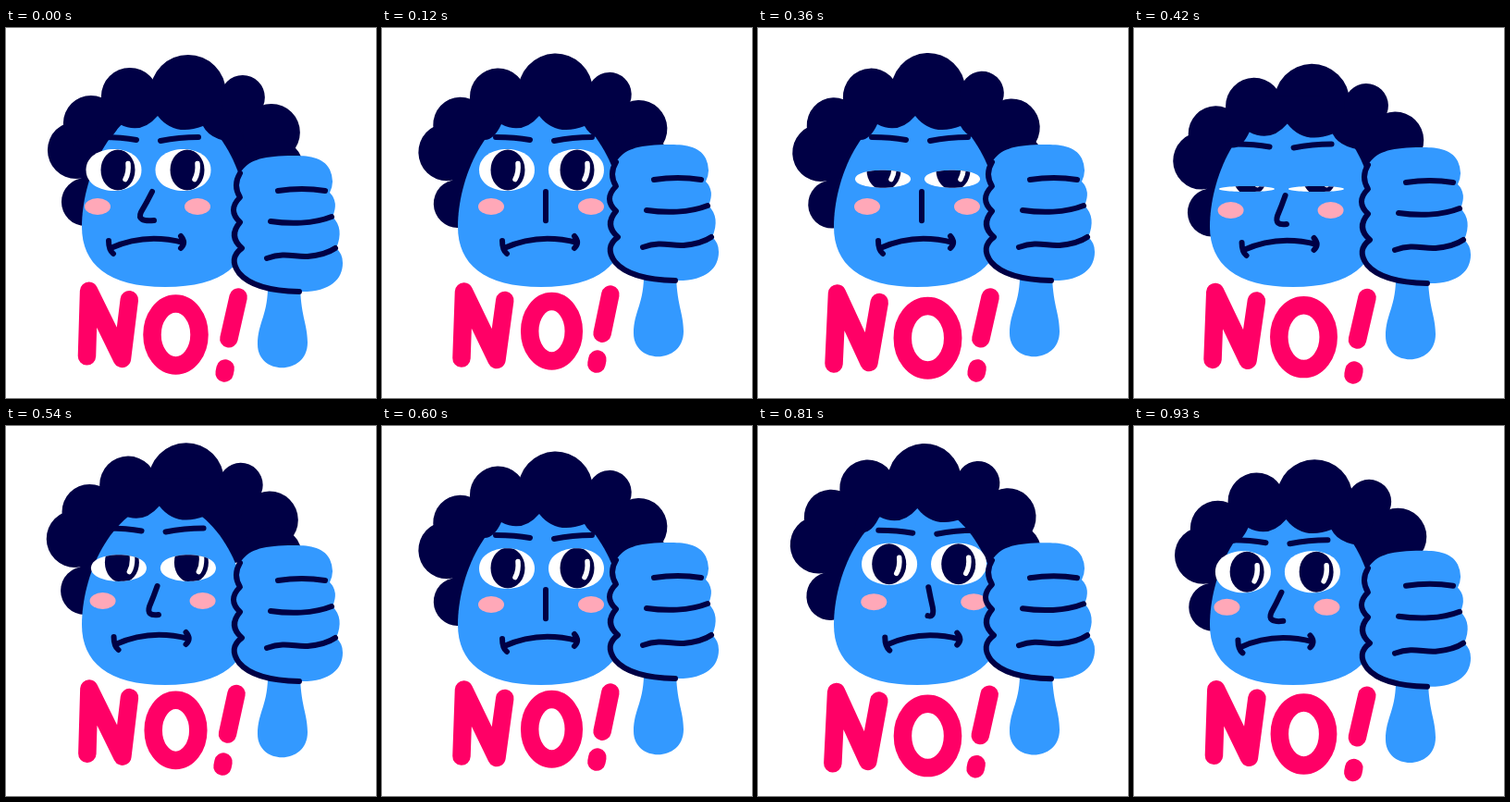
An HTML page with a canvas that plays this animation: 400x400 px, repeating every 960 ms.

```html
<!DOCTYPE html>
<html>
<head>
<meta charset="utf-8">
<title>No!</title>
<style>
  html, body { margin: 0; width: 100%; height: 100%; overflow: hidden; background: #fff; }
  canvas { display: block; width: 400px; height: 400px; }
</style>
</head>
<body>
<canvas id="stage" width="400" height="400"></canvas>
<script>
const ctx = document.getElementById('stage').getContext('2d');
const LOOP = 960, STEP = 30, TAU = Math.PI * 2;
const BLUE = '#3399ff', NAVY = '#000045', PINK = '#ff0066', BLUSH = '#ffa8b8';

// Curls around the head: x, y, radius
const curls = [
  [86, 188, 26], [76, 132, 31], [92, 103, 30], [134, 74, 31],
  [197, 70, 41], [256, 75, 24], [287, 113, 31], [290, 152, 32]
];
const face = 'M82 215C82 165 110 90 172 80C234 90 262 165 262 215C262 255 235 280 172 280C110 280 82 255 82 215Z';
const fringe = 'M96 118Q112 128 123 104Q146 116 164 95Q182 118 213 106Q222 124 258 124L250 100L200 65L140 65L100 100Z';
const thumb = 'M283 275C284 310 272 318 272 342C272 376 326 376 326 340C326 320 318 310 318 275Z';
const knuckles = 'M253 157Q245 170 253 183Q239 197 253 210Q240 225 255 238Q240 249 252 265Q268 284 317 285';
const fist = knuckles + 'C350 286 364 272 364 254Q364 244 357 238Q366 217 353 204Q360 188 350 178Q356 166 350 153' +
  'C342 137 320 138 305 138C275 139 262 143 253 157Z';
const fingerLines = 'M294 176Q320 172 345 176M286 209C306 212 332 212 352 204M282 249C302 242 312 248 326 247Q346 245 356 238';

const smooth = (from, to, t) => {
  const u = Math.min(1, Math.max(0, (t - from) / (to - from)));
  return u * u * (3 - 2 * u);
};

function fill(path, color) {
  ctx.fillStyle = color;
  ctx.fill(new Path2D(path));
}

function stroke(path, color = NAVY, width = 6) {
  ctx.strokeStyle = color;
  ctx.lineWidth = width;
  ctx.stroke(new Path2D(path));
}

function oval(x, y, rx, ry, color) {
  ctx.fillStyle = color;
  ctx.beginPath();
  ctx.ellipse(x, y, rx, ry, 0, 0, TAU);
  ctx.fill();
}

function group(dx, dy, draw) {
  ctx.save();
  ctx.translate(dx, dy);
  draw();
  ctx.restore();
}

function drawHair(turn, bob) {
  ctx.save();
  ctx.transform(1 - .03 * turn, -.07 * turn, .07 * turn, 1, -21.3 * turn, 10.5 * (turn - bob));
  fill('M' + curls.map(([x, y]) => x + ' ' + y).join('L') + 'Z', NAVY);
  for (const [x, y, r] of curls) oval(x, y, r, r, NAVY);
  ctx.restore();
}

function drawEye(x, y, look, shut) {
  const lid = 30 - 26 * shut;
  group(x, y + 14.5 * shut, () => {
    const shape = `M-30 0C-30 ${-lid} 30 ${-lid} 30 0C30 ${lid} -30 ${lid} -30 0Z`;
    fill(shape, '#fff');
    ctx.clip(new Path2D(shape));
    ctx.translate(look, -14.5 * shut);
    oval(0, 0, 18.5, 22, NAVY);
    stroke('M11 -7Q12 3 8 10', '#fff', 5.5);
  });
}

function drawFeatures(side, bob, shut) {
  const dx = 19 * side;
  group(dx, -7.5 * bob, () => stroke('M123 118Q144 118 160 121M186 122Q206 118 227 118'));
  for (const x of [135, 210]) drawEye(x + 18.5 * side, 153.5 - 6 * bob, 1 - 3.5 * side, shut);
  group(dx, -4 * bob, () => {
    oval(118, 193, 14, 9, BLUSH);
    oval(226, 193, 14, 9, BLUSH);
  });
  const noseX = reach => 177 + reach * side;
  group(0, -4 * bob, () =>
    stroke(`M${noseX(19)} 177Q${noseX(25)} 189 ${noseX(31)} 199Q${noseX(36)} 210 ${noseX(17)} 208`));
  group(dx, -2 * bob, () =>
    stroke('M132 238Q169 221 211 232M130 230Q130 240 135 244M208 225Q214 232 208 238'));
}

function drawHand(lift) {
  group(0, -lift, () => {
    fill(thumb, BLUE);
    fill(fist, BLUE);
    stroke(knuckles);
    stroke(fingerLines);
  });
}

function drawWord(phase) {
  const n = Math.cos(phase - .52), o = Math.sin(phase), e = Math.cos(phase + .78);
  stroke(`M${84 + 4 * n} ${360 - 6 * n}L${87 + 3 * n} ${286 - 2 * n}` +
    `L${122 + 4 * n} ${360 - 3 * n}L${132 + 1.5 * n} ${295.5 - 2 * n}`, PINK, 19.5);
  ctx.beginPath();
  ctx.ellipse(183.5, 331.5 - 3.7 * o, 25.5 - 1.7 * o, 33.5 - 1.3 * o, 0, 0, TAU);
  ctx.stroke();
  const dotX = 234 + 3 * e, dotY = 366 + 7 * e;
  stroke(`M${249 + 3 * e} ${289.5 + 2 * e}L${239.5 + 2 * e} ${333 + 4 * e}` +
    `M${dotX + 1} ${dotY - 3}L${dotX} ${dotY + 2}`, PINK, 19.5);
}

function draw(t) {
  const phase = t / 480 * TAU;
  const side = -Math.cos(phase);
  const bob = Math.sin(2 * phase);
  const shut = smooth(280, 410, t) - smooth(440, 620, t);
  const drop = (1 + Math.cos(2 * phase)) / 2;

  ctx.clearRect(0, 0, 400, 400);
  ctx.lineCap = ctx.lineJoin = 'round';
  drawHair((1 - Math.cos(phase - .16)) / 2, bob);
  fill(face, BLUE);
  drawFeatures(side, bob, shut);
  group(6 + 6 * side, -8.5 * bob, () => fill(fringe, NAVY));
  drawWord(phase);
  drawHand(12 * (1 - drop * drop));
}

function tick() {
  draw(Math.floor(performance.now() % LOOP / STEP) * STEP);
  requestAnimationFrame(tick);
}
tick();
</script>
</body>
</html>
```
